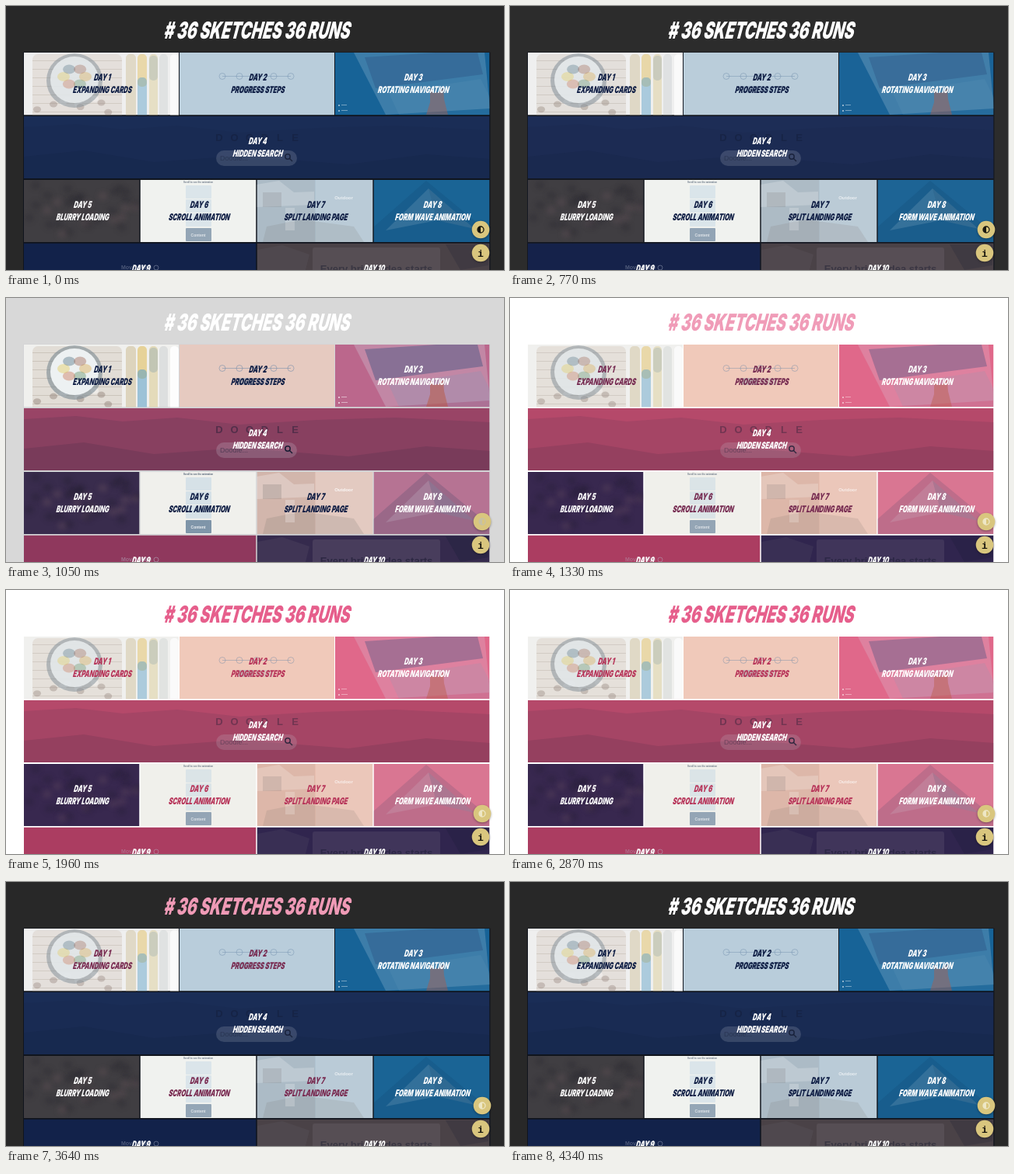
An HTML page with a canvas for the animation above (4.41 s loop, 640 by 340 pixels).

```html
<!DOCTYPE html>
<html lang="en">
<head>
<meta charset="utf-8">
<title>Project grid theme switch</title>
<style>
html, body { margin: 0; width: 100%; height: 100%; overflow: hidden; background: #282828; }
canvas { display: block; }
</style>
</head>
<body>
<canvas id="stage" width="640" height="340"></canvas>
<script>
const ctx = document.getElementById('stage').getContext('2d');
const LOOP = 4410, FADE = 350;
const TO_LIGHT = 765, TO_DARK = 3163;
const NARROW = 0.64, SLANT = -0.16;

const clamp = v => Math.max(0, Math.min(1, v));
const ramp = (t, start, length) => clamp((t - start) / length);
const noise = n => { const v = Math.sin(n * 127.1) * 43758.5453; return v - Math.floor(v); };
const channels = hex => [1, 3, 5].map(i => parseInt(hex.slice(i, i + 2), 16));
function mix(a, b, p) {
  const to = channels(b);
  return `rgb(${channels(a).map((v, i) => Math.round(v + (to[i] - v) * p))})`;
}

let ghost = 1; // visibility of the thumbnails
function paint(color, alpha) {
  ctx.fillStyle = ctx.strokeStyle = color;
  ctx.globalAlpha = Math.min(1, alpha * ghost);
}
function box(x, y, w, h, color, alpha = 1, r = 0) {
  paint(color, alpha);
  ctx.beginPath();
  ctx.roundRect(x, y, w, h, r);
  ctx.fill();
}
function oval(x, y, rx, ry, color, alpha = 1) {
  paint(color, alpha);
  ctx.beginPath();
  ctx.ellipse(x, y, rx, ry, 0, 0, 7);
  ctx.fill();
}
function ring(x, y, r, color, alpha = 1, width = 1) {
  paint(color, alpha);
  ctx.lineWidth = width;
  ctx.beginPath();
  ctx.arc(x, y, r, 0, 7);
  ctx.stroke();
}
function poly(points, color, alpha = 1) {
  paint(color, alpha);
  ctx.beginPath();
  for (let i = 0; i < points.length; i += 2) ctx.lineTo(points[i], points[i + 1]);
  ctx.fill();
}
function label(text, x, y, size, color, alpha = 1, font = 'bold', align = 'left') {
  paint(color, alpha);
  ctx.font = `${font} ${size}px "Liberation Sans", sans-serif`;
  ctx.textAlign = align;
  ctx.fillText(text, x, y);
}
function comic(text, x, y, size, color) {
  ctx.save();
  ctx.transform(NARROW, 0, SLANT, 1, x, y);
  ctx.font = `italic 900 ${size}px Inter, "Liberation Sans", sans-serif`;
  ctx.textAlign = 'center';
  ctx.fillStyle = color;
  ctx.fillText(text, 0, 0);
  ctx.restore();
}

const thumbs = {
  cards() {
    box(34, 62, 115, 90, '#c9bbad', 0.3, 7);
    for (let y = 70; y < 140; y += 11) box(34, y, 115, 1, '#87776a', 0.2);
    for (let i = 0; i < 9; i++) {
      oval(40 + noise(i) * 102, 118 + noise(i + 20) * 20, 5, 4, i % 2 ? '#ffffff' : '#8a7a70', 0.35);
    }
    oval(88, 96, 36, 35, '#71818c', 0.45);
    oval(88, 95, 31, 30, '#eef2f3', 0.8);
    ['#d8a13d', '#5a8a5b', '#c86a4a', '#e4c84d', '#4b6a7c', '#9a5b48'].forEach((c, i) =>
      oval(88 + 14 * Math.cos(i * 1.05), 91 + 11 * Math.sin(i * 1.05), 8, 6, c, 0.32));
    box(154, 62, 13, 90, '#c8b68a', 0.4, 5);
    box(169, 62, 12, 42, '#dfbb55', 0.45, 5);
    box(169, 92, 12, 60, '#5a9ec6', 0.45, 5);
    box(184, 62, 11, 90, '#d7c585', 0.4, 5);
    box(184, 64, 11, 32, '#8aa2aa', 0.3, 5);
    box(197, 62, 11, 90, '#bcc2c4', 0.3, 5);
    box(211, 62, 11, 90, '#ffffff', 0.7, 5);
  },
  steps() {
    box(278, 90, 88, 1, '#6685a6', 0.4);
    for (let x = 278; x <= 366; x += 22) ring(x, 90.5, 4, '#6685a6', 0.4);
    box(298, 103, 21, 9, '#7d93a7', 0.4, 2);
    box(321, 103, 22, 9, '#7796b5', 0.2, 2);
  },
  rotate() {
    poly([447, 60, 615, 60, 622, 132, 488, 140], '#d6e4ee', 0.2);
    poly([461, 66, 553, 60, 606, 60, 613, 88, 475, 106], '#274878', 0.3);
    poly([492, 112, 610, 94, 622, 118, 622, 140, 505, 140], '#6a9ebb', 0.15);
    poly([545, 106, 549, 112, 556, 111, 562, 106, 563, 120, 568, 140, 540, 140, 545, 124], '#b8553d', 0.4);
    box(427, 127, 2, 2, '#ffffff', 0.5);
    box(431, 127, 7, 1, '#ffffff', 0.4);
    box(427, 134, 2, 2, '#ffffff', 0.5);
    box(431, 134, 8, 1, '#ffffff', 0.4);
  },
  search() {
    poly([22, 156, 90, 152, 150, 159, 220, 154, 300, 163, 400, 157, 500, 154, 622, 160, 622, 222, 22, 222], '#17233c', 0.1);
    poly([22, 194, 100, 186, 190, 201, 300, 193, 440, 204, 540, 191, 622, 197, 622, 222, 22, 222], '#10182f', 0.1);
    [...'DOODLE'].forEach((c, i) => label(c, 274 + i * 19.5, 174, 13, '#10182f', 0.35, 'bold', 'center'));
    box(270, 186, 104, 20, '#c7cbd7', 0.18, 10);
    label('Doodle...', 275, 199, 9, '#10182f', 0.35, 'normal');
    ring(362, 194, 3.2, '#10182f', 0.75, 1.5);
    poly([364, 197, 365, 196, 368.5, 199.5, 367.5, 200.5], '#10182f', 0.75);
  },
  blur() {
    ctx.filter = 'blur(3px)';
    for (let i = 0; i < 34; i++) {
      oval(25 + noise(i + 50) * 145, 228 + noise(i + 90) * 75, 6, 5, i % 3 ? '#15151c' : '#80646a', 0.2);
    }
    ctx.filter = 'none';
  },
  scroll() {
    label('Scroll to see the animation', 247, 228, 3, '#34455d', 0.7, 'bold', 'center');
    [231, 249, 267].forEach(y => box(231, y, 33, 17, '#a9c7de', 0.3, 1));
    box(231, 286, 33, 17, '#647f99', 0.65, 1);
    label('Content', 247, 297, 5, '#ffffff', 0.7, 'bold', 'center');
  },
  split() {
    box(323, 223, 74, 82, '#8b7c73', 0.12);
    box(398, 223, 74, 82, '#ffffff', 0.12);
    poly([322, 230, 351, 225, 370, 240, 396, 239, 396, 256, 322, 259], '#ffffff', 0.2);
    box(330, 240, 24, 19, '#6b6565', 0.17);
    poly([335, 284, 380, 275, 447, 284, 460, 304, 330, 304], '#746b69', 0.15);
    box(359, 260, 12, 29, '#ffffff', 0.2);
    label('Outdoor', 434, 249, 6, '#ffffff', 0.7, 'bold', 'center');
  },
  wave() {
    poly([540, 225, 621, 292, 621, 304, 472, 304, 472, 285], '#092f55', 0.13);
    poly([543, 235, 602, 287, 554, 276, 488, 289], '#d4e1e9', 0.14);
    poly([543, 235, 554, 276, 602, 287], '#12385f', 0.12);
  },
  dots() {
    label('Move', 148, 339, 7, '#bac1d1', 0.35);
    box(169, 334, 18, 5, '#bac1d1', 0.25, 2);
    ring(193, 337, 3, '#bac1d1', 0.4);
  },
  brush() {
    poly([323, 314, 355, 308, 390, 320, 385, 340, 323, 340], '#77717b', 0.13);
    box(394, 311, 164, 35, '#aaa0aa', 0.13, 3);
    label('Every bright idea starts', 476, 343, 13, '#101329', 0.4, 'bold', 'center');
    poly([565, 307, 620, 307, 620, 334, 584, 340], '#11172d', 0.18);
  }
};

// x, y, width, height, title, dark fill, light fill, white text, thumbnail
const tiles = [
  [23, 60, 199, 80.5, 'EXPANDING CARDS', '#efefef', '#f0f0ee', 0, 'cards'],
  [223, 60, 199, 80.5, 'PROGRESS STEPS', '#b9cddb', '#f0c9ba', 0, 'steps'],
  [423, 60, 198.5, 80.5, 'ROTATING NAVIGATION', '#176397', '#e0688a', 1, 'rotate'],
  [23, 142, 598.5, 80, 'HIDDEN SEARCH', '#1a2d56', '#b5496a', 1, 'search'],
  [23, 224, 148.5, 80, 'BLURRY LOADING', '#403e42', '#38284f', 1, 'blur'],
  [172.5, 224, 149, 80, 'SCROLL ANIMATION', '#f0f2ef', '#f0f0eb', 0, 'scroll'],
  [322.5, 224, 149, 80, 'SPLIT LANDING PAGE', '#b0c4d1', '#e8bfb0', 0, 'split'],
  [472.5, 224, 149, 80, 'FORM WAVE ANIMATION', '#1a6495', '#d97692', 1, 'wave'],
  [23, 305.5, 298.5, 80, '', '#12224a', '#ab3d61', 1, 'dots'],
  [322.5, 305.5, 299, 80, '', '#4a4247', '#30254e', 1, 'brush']
];

function disc(x, y) {
  ctx.save();
  ctx.shadowColor = 'rgba(0,0,0,.35)';
  ctx.shadowBlur = 3;
  ctx.shadowOffsetY = 1;
  oval(x, y, 11.3, 11.3, '#d9c67e');
  ctx.restore();
}

function draw(t) {
  const light = ramp(t, TO_LIGHT, FADE) - ramp(t, TO_DARK, FADE);
  // inherited text colours begin once the page has faded
  const ink = ramp(t, TO_LIGHT + FADE, FADE) - ramp(t, TO_DARK + FADE, FADE);

  ghost = 1;
  box(0, 0, 640, 340, mix('#282828', '#ffffff', light));
  comic('# 36 SKETCHES 36 RUNS', 322, 41.5, 30, mix('#ffffff', '#e65f8c', ink));
  box(22, 59.5, 600.5, 281, mix('#10141d', '#ffffff', light));

  tiles.forEach(([x, y, w, h, title, dark, pale, white, thumb], i) => {
    ctx.save();
    ctx.beginPath();
    ctx.rect(x, y, w, h);
    ctx.clip();
    ghost = 1;
    box(x, y, w, h, mix(dark, pale, light));
    ghost = 1 + 1.6 * light * (1 - light);
    thumbs[thumb]();
    ghost = ctx.globalAlpha = 1;
    const color = white ? '#ffffff' : mix('#0d1c43', '#b73459', ink);
    comic('DAY ' + (i + 1), x + w / 2 + 1, y + 36.2, 12, color);
    comic(title, x + w / 2 + 1, y + 52.4, 12, color);
    ctx.restore();
  });

  const x = 610 + 2 * ramp(t, 150, 350);
  const icon = mix('#17150e', '#eee7c5', ramp(t, TO_LIGHT, FADE));
  disc(x, 288);
  ring(x, 288, 4, icon, 1, 1.3);
  ctx.beginPath();
  ctx.arc(x, 288, 4, Math.PI / 2, Math.PI * 1.5);
  ctx.fill();

  disc(610, 318);
  ctx.fillStyle = '#17150e';
  ctx.font = 'bold 13px "Liberation Mono", monospace';
  ctx.textAlign = 'center';
  ctx.fillText('i', 610, 322.5);
}

function tick() {
  draw(performance.now() % LOOP);
  requestAnimationFrame(tick);
}
tick();
</script>
</body>
</html>
```
